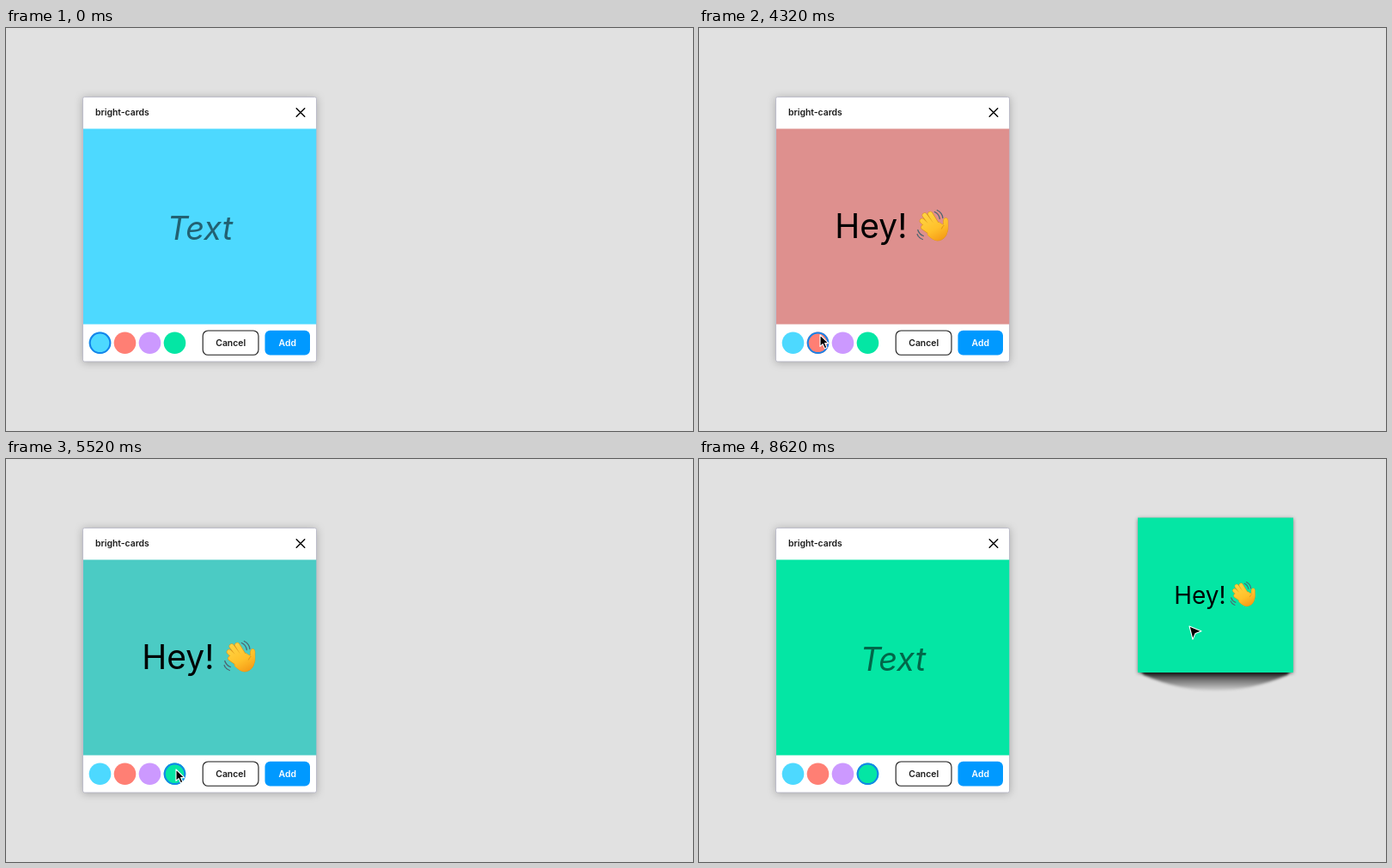
Animation, 800 px wide and 470 px high, one loop 8640 ms. Source, as an HTML page:

```html
<!DOCTYPE html>
<html lang="en">
<head>
<meta charset="utf-8">
<title>Note composer</title>
<style>
  html, body { margin: 0; height: 100%; overflow: hidden; background: #e1e1e1; }
  svg { display: block; width: 100vw; height: 100vh; font-family: Inter, sans-serif; }
  text { white-space: pre; }
  .label { font-size: 10.4px; font-weight: 600; }
  .panel { filter: drop-shadow(0 1px 5px rgba(0, 0, 0, .25)); }
  .paper { filter: drop-shadow(0 1px 2px rgba(0, 0, 0, .45)); }
  .curl { filter: blur(1.5px); }
</style>
</head>
<body>
<svg viewBox="0 0 800 470">
  <defs>
    <linearGradient id="skin" gradientUnits="userSpaceOnUse" x1="10" y1="4" x2="28" y2="38">
      <stop offset="0" stop-color="#ffd545"/>
      <stop offset=".6" stop-color="#ffc02a"/>
      <stop offset="1" stop-color="#f59a16"/>
    </linearGradient>
    <linearGradient id="shade" gradientUnits="userSpaceOnUse" x1="0" y1="248" x2="0" y2="271">
      <stop offset="0" stop-color="#000" stop-opacity=".9"/>
      <stop offset=".4" stop-color="#000" stop-opacity=".5"/>
      <stop offset="1" stop-color="#000" stop-opacity=".04"/>
    </linearGradient>
    <g id="fingers" fill="none" stroke-linecap="round">
      <path d="M25 21 16 6.5M21 23 9.5 8M18 25 6.5 14.5M18 29 8 22"/>
    </g>
    <g id="palm">
      <path d="M13 25 26 16 Q30 19 31.5 19 Q30.5 11 34 11 Q37 11 36.5 17 Q37.5 25 34.5 31 Q31 37.5 24 37.5 Q19 37 13 31Z"/>
    </g>
    <g id="wave">
      <use href="#fingers" stroke="#dd9418" stroke-width="6.2"/>
      <use href="#palm" fill="#dd9418" stroke="#dd9418" stroke-width=".8"/>
      <use href="#fingers" stroke="url(#skin)" stroke-width="5.1"/>
      <use href="#palm" fill="url(#skin)"/>
      <path d="M29 24 Q30 21 32 19.5" fill="none" stroke="#dd9418" stroke-width="1"/>
      <path d="M21 4 Q26 6 27 12M24 2 Q30 5 30.5 11M1.5 25 Q3 30 8 32M.8 30 Q2.5 34.5 7 36"
            fill="none" stroke="#4e6570" stroke-width="1.3" stroke-linecap="round"/>
    </g>
  </defs>

  <rect width="800" height="470" fill="#e1e1e1"/>

  <rect class="panel" x="89.5" y="80.5" width="272" height="308.5" rx="2" fill="#fff" stroke="#b4b4c4" stroke-width=".8"/>
  <rect id="card" x="90" y="117.5" width="271.3" height="228"/>
  <text class="label" x="104" y="102" fill="#1a1a1a">bright-cards</text>
  <path d="M338.2 93.7 347.8 103.3M347.8 93.7 338.2 103.3" stroke="#000" stroke-width="1.4" stroke-linecap="round"/>

  <text id="hint" x="226" y="247" font-size="38" font-style="italic" text-anchor="middle" opacity=".55">Text</text>
  <rect id="field" x="118" width="215" fill="none" stroke="#0898f6" stroke-width="2"/>
  <text id="typed" y="245" font-size="39"></text>
  <use id="hand" href="#wave"/>
  <rect id="caret" y="209" width="1.4"/>

  <g id="swatches"></g>
  <rect x="229.2" y="353" width="64.8" height="28.3" rx="6" fill="#fff" stroke="#1a1a1a" stroke-width="1.1"/>
  <text class="label" x="261.7" y="371" text-anchor="middle" fill="#1a1a1a">Cancel</text>
  <rect x="301.5" y="352.8" width="52.5" height="28.8" rx="6" fill="#09f"/>
  <text class="label" x="327.7" y="371" text-anchor="middle" fill="#fff">Add</text>

  <g id="note">
    <path class="curl" d="M514 247 H689 L685 252 Q601 288 518 252Z" fill="url(#shade)"/>
    <rect class="paper" x="511" y="68.5" width="181" height="180.5" fill="#04e6a4"/>
    <text x="553.3" y="169" font-size="27.9">Hey!</text>
    <use href="#wave" transform="translate(618.5 142) scale(.79)"/>
  </g>

  <path id="pointer" stroke="#fff" stroke-width="1.1" stroke-linejoin="round"/>
</svg>
<script>
const LOOP = 8640;
const $ = id => document.getElementById(id);
const set = (id, attrs) => {
  for (const name in attrs) $(id).setAttribute(name, attrs[name]);
};
const show = (id, on) => set(id, { visibility: on ? 'visible' : 'hidden' });

const COLORS = [[77, 217, 255], [255, 127, 116], [204, 153, 255], [4, 230, 164]];
const rgb = c => `rgb(${c.map(Math.round)})`;

const FOCUS = 1050, BLUR = 4150, ADD = 6420, PLACED = 7960;
const PICKS = [BLUR, 4700, 5400];
const KEYS = [1600, 1720, 1860, 2080, 2250, 2650];
const FADE = 300, BLINK = 530;

const ARROW = 'M0 0V13.4L3.1 10.6 5.4 15.8 7.9 14.7 5.6 9.6H9.8Z';
const CANVAS_ARROW = 'M0 0 14 5.8 7 8.4 4 15.4Z';

// Pointer stops: time, x, y
const STOPS = [
  [350, 252, -20], [950, 230, 219], [3350, 230, 219], [4050, 141, 358],
  [4400, 141, 358], [4650, 170, 361], [4980, 170, 361], [5300, 198, 362],
  [5600, 198, 362], [6120, 307, 355], [6500, 307, 355], [7030, 536, 209],
  [7940, 537, 208], [8350, 571, 195], [LOOP, 571, 195]
];

$('swatches').innerHTML = COLORS.map((c, i) =>
  `<circle cx="${109.5 + 29 * i}" cy="367.3" r="12.8" fill="${rgb(c)}"/>`).join('') +
  '<circle id="ring" cy="367.3" r="11.8" fill="none" stroke="#1583ea" stroke-width="2"/>';

const smooth = u => u * u * (3 - 2 * u);

function pointerAt(t) {
  const i = STOPS.findIndex(s => s[0] > t);
  if (i < 1) return [252, -20];
  const [t0, x0, y0] = STOPS[i - 1], [t1, x1, y1] = STOPS[i];
  const k = smooth((t - t0) / (t1 - t0));
  return [x0 + (x1 - x0) * k, y0 + (y1 - y0) * k];
}

function drawColor(t) {
  const pick = PICKS.filter(p => p <= t).length;
  let color = COLORS[pick];
  if (pick) {
    const u = Math.min(1, (t - PICKS[pick - 1]) / FADE);
    const k = 1 - (1 - u) ** 2;
    color = COLORS[pick - 1].map((c, i) => c + (color[i] - c) * k);
  }
  set('card', { fill: rgb(color) });
  set('ring', { cx: 109.5 + 29 * pick });
}

function drawText(t) {
  const focused = t >= FOCUS && t < BLUR;
  const count = t < ADD ? KEYS.filter(k => k <= t).length : 0;
  const waving = count === KEYS.length;
  $('typed').textContent = 'Hey! '.slice(0, count);

  const textWidth = count ? $('typed').getComputedTextLength() : 0;
  const width = textWidth + (waving ? 39 : 0);
  const left = 225.3 - width / 2;
  set('typed', { x: left });
  set('hand', { transform: `translate(${left + textWidth} 210.5)` });
  show('hand', waving);
  show('hint', !count && !focused);

  const grow = waving ? 1.3 : 0;
  set('field', { y: 208.3 - grow, height: 48 + 2 * grow });
  show('field', focused);

  const lastInput = count ? KEYS[count - 1] : FOCUS;
  set('caret', { x: left + width - (waving ? 2.5 : 0), y: 209 - grow, height: waving ? 45.5 : 46 });
  show('caret', focused && Math.floor((t - lastInput) / BLINK) % 2 === 0);
}

function drawPointer(t) {
  const [x, y] = pointerAt(t);
  set('pointer', { d: x > 362 ? CANVAS_ARROW : ARROW, transform: `translate(${x} ${y})` });
  show('pointer', t < KEYS[0] || t >= 3350);
}

function frame() {
  const t = performance.now() % LOOP;
  drawColor(t);
  drawText(t);
  drawPointer(t);
  show('note', t >= PLACED);
  requestAnimationFrame(frame);
}
frame();
</script>
</body>
</html>
```
